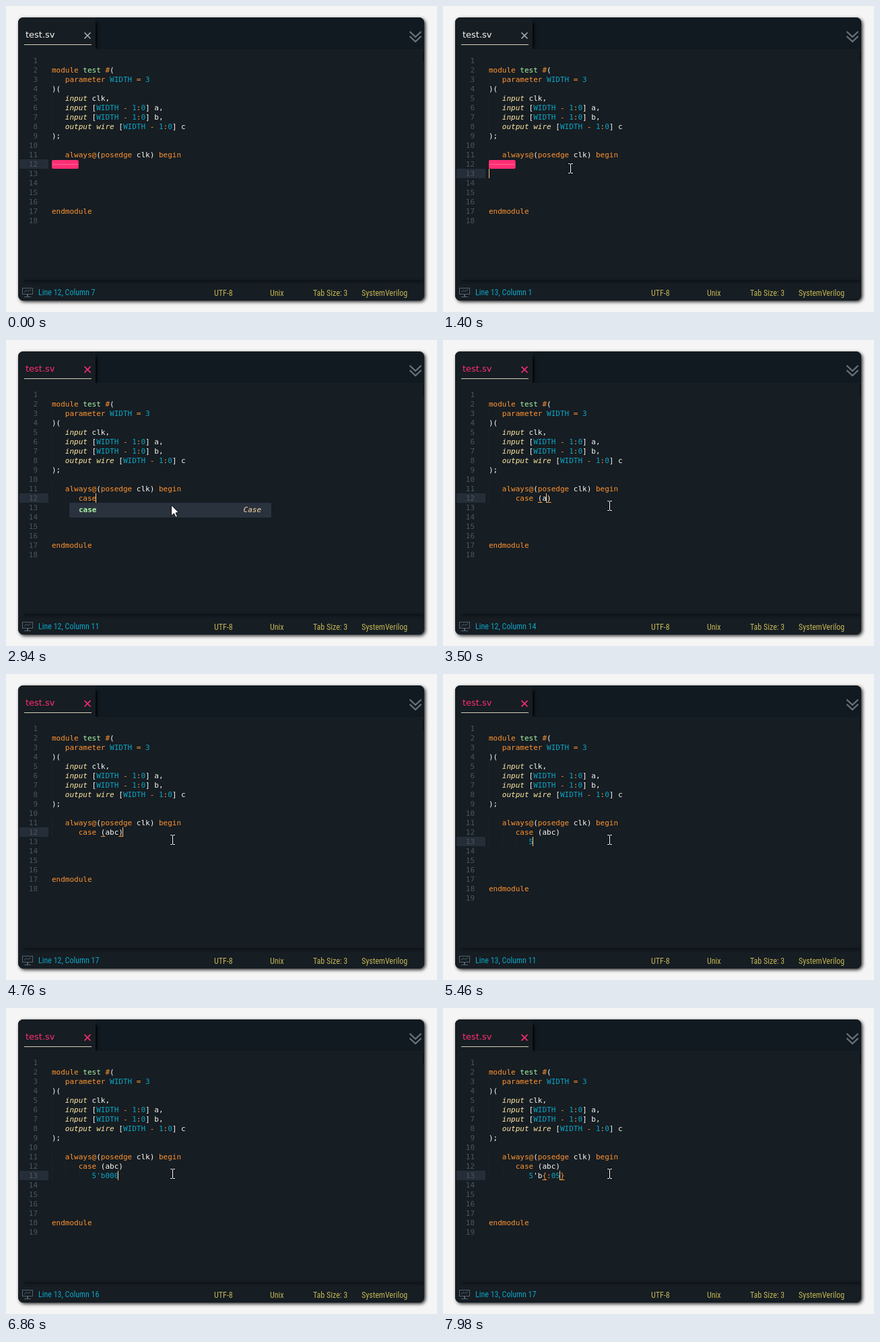
An HTML page with a canvas for the animation above (8 s loop, 640 by 455 pixels).

```html
<!DOCTYPE html>
<html lang="en">
<head>
<meta charset="utf-8">
<title>Code editor</title>
<style>
html, body { margin: 0; width: 640px; height: 455px; overflow: hidden; background: #f5f5f5; }
canvas { display: block; }
</style>
</head>
<body>
<canvas id="stage" width="640" height="455"></canvas>
<script>
const g = document.getElementById('stage').getContext('2d');
const LOOP = 8000, TICK = 140, NEWLINE = 5040, DIRTY = 2520;
const LEFT = 68, CHAR = 6.622, ROW = 14;
const MONO = '11px "DejaVu Sans Mono", monospace';
const STATUS = '12px "Roboto Condensed", Roboto, sans-serif';
const C = {
  bg: '#161d23', bar: '#111a20', white: '#f8f8f2', orange: '#ff9430', blue: '#0ca5c4',
  yellow: '#ffe9a0', green: '#aef5a8', pink: '#ff2f74', gold: '#c3b552', dim: '#4a565f'
};

const source = `
module test #(
   parameter WIDTH = 3
)(
   input clk,
   input [WIDTH - 1:0] a,
   input [WIDTH - 1:0] b,
   output wire [WIDTH - 1:0] c
);

   always@(posedge clk) begin
      




endmodule
`.split('\n');

// [time, line, indent, text, caret distance from the line end, completion]
const edits = [
  [0, 12, 6, '', 0],
  [1120, 13, 0, '', 0],
  [1680, 12, 6, '', 0],
  [2520, 12, 6, 'c', 0],
  [2660, 12, 6, 'ca', 0, 'case'],
  [2800, 12, 6, 'cas', 0, 'case'],
  [2940, 12, 6, 'case', 0, 'case'],
  [3080, 12, 6, 'case', 0],
  [3220, 12, 6, 'case ', 0],
  [3360, 12, 6, 'case ()', 1],
  [3500, 12, 6, 'case (a)', 1],
  [3640, 12, 6, 'case (ab)', 1],
  [3920, 12, 6, 'case (a)', 1],
  [4060, 12, 6, 'case ()', 1],
  [4200, 12, 6, 'case ', 0],
  [4340, 12, 6, 'case ()', 1],
  [4480, 12, 6, 'case (ab)', 1],
  [4620, 12, 6, 'case (abc)', 1],
  [4760, 12, 6, 'case (abc)', 0],
  [NEWLINE, 13, 6, '', 0],
  [5320, 13, 9, '', 0],
  [5460, 13, 9, '5', 0],
  [5600, 13, 9, "5'", 0],
  [6160, 13, 9, "5'b", 0],
  [6300, 13, 9, "5'b", 0, 'begin'],
  [6580, 13, 9, "5'b0", 0],
  [6720, 13, 9, "5'b00", 0],
  [6860, 13, 9, "5'b000", 0],
  [7000, 13, 9, "5'b", 0],
  [7420, 13, 9, "5'b{}", 1],
  [7560, 13, 9, "5'b{:0}", 1],
  [7700, 13, 9, "5'b{:05}", 1]
];

const TOKENS = /\b(input|output|wire)\b|\b(module|parameter|always|posedge|begin|endmodule|case)\b|([#=@:{}-])|(WIDTH|\d+(?:'b\d+)?)|\b(test)\b|[^\s]/g;

const colX = col => LEFT + col * CHAR;
const rowY = line => 74 + (line - 1) * ROW;

function box(x, y, w, h, color) {
  g.fillStyle = color;
  g.fillRect(x, y, w, h);
}

function text(str, x, y, color, font = MONO, align = 'left') {
  g.font = font;
  g.textAlign = align;
  g.fillStyle = color;
  g.fillText(str, x, y);
}

function stroke(points, color, width = 1) {
  g.strokeStyle = color;
  g.lineWidth = width;
  g.beginPath();
  points.forEach(([x, y]) => g.lineTo(x, y));
  g.stroke();
}

function shadow(color, blur, dx, dy) {
  g.shadowColor = color;
  g.shadowBlur = blur;
  g.shadowOffsetX = dx;
  g.shadowOffsetY = dy;
}

function drawWindow(dirty) {
  box(0, 0, 640, 455, '#f5f5f5');
  g.save();
  shadow('rgba(0,0,0,.85)', 5, 2, 2);
  g.fillStyle = C.bg;
  g.beginPath();
  g.roundRect(18, 17, 603, 421, 8);
  g.fill();
  shadow('transparent', 0, 0, 0);
  g.clip();
  box(18, 17, 603, 47, C.bar);
  shadow('#000', 4, 2, 0);
  box(18, 25, 115, 39, C.bg);
  shadow('transparent', 0, 0, 0);
  box(18, 64, 603, 374, C.bg);
  box(18, 17, 115, 47, C.bg);
  box(619, 67, 1, 16, '#0a0f13');
  shadow('#000', 4, 1, 1);
  box(27, 408, 592, 1, '#0b1014');
  g.restore();

  text('test.sv', 29, 47, dirty ? C.pink : C.white, '13px "DejaVu Sans", sans-serif');
  box(27, 57, 100, 1, '#d5d0b8');
  const cross = dirty ? C.pink : '#a4abb0';
  stroke([[116.5, 39.5], [125.5, 48.5]], cross, 1.7);
  stroke([[125.5, 39.5], [116.5, 48.5]], cross, 1.7);
  for (const y of [38, 45]) stroke([[599.5, y], [608, y + 8], [616.5, y]], '#69747c', 2.3);
}

function drawStatus(line, col) {
  g.strokeStyle = '#53616b';
  g.lineWidth = 1;
  g.strokeRect(24.5, 419.5, 15, 9);
  stroke([[27, 425.5], [31, 422.5], [33, 424.5], [37, 421.5]], '#53616b');
  stroke([[32, 429], [32, 432]], '#53616b', 2);
  stroke([[27, 432.5], [37, 432.5]], '#53616b');
  text(`Line ${line}, Column ${col}`, 48, 430, C.blue, STATUS);
  [['UTF-8', 309], ['Unix', 392], ['Tab Size: 3', 456], ['SystemVerilog', 528]]
    .forEach(([label, x]) => text(label, x, 431, C.gold, STATUS));
}

function drawLine(str, line) {
  const y = rowY(line);
  text(line, 47, y + 11, C.dim, MONO, 'right');
  const indent = str.match(/^ */)[0].length;
  for (let col = 0; col < indent; col += 3)
    for (let dy = 0; dy < ROW; dy += 2) box(Math.round(colX(col)), y + dy, 1, 1, '#20282f');
  const tail = str.match(/ +$/);
  if (tail) {
    const x = colX(tail.index), w = tail[0].length * CHAR;
    g.fillStyle = C.pink;
    g.beginPath();
    g.roundRect(x, y + 1, w, 13, 2);
    g.fill();
    if (w > 20) box(x + 1, y + 7, w - 2, 1, '#ff6695');
  }
  for (const m of str.matchAll(TOKENS)) {
    const color = m[1] ? C.yellow : m[2] || m[3] ? C.orange : m[4] ? C.blue : m[5] ? C.green : C.white;
    text(m[0], colX(m.index), y + 11, color, (m[1] ? 'italic ' : '') + MONO);
  }
}

function drawCaret(str, line, col, visible) {
  const y = rowY(line);
  const open = str.search(/[({]/), close = str.search(/[)}]/);
  if (open >= 0 && col > open && col <= close + 1)
    for (const c of [open, close]) box(colX(c), y + 13, CHAR, 1, C.orange);
  if (visible) box(Math.round(colX(col)) - 1 + (col === 0), y, 1, ROW, '#ffc078');
}

function drawPopup(word, line, col) {
  const x = Math.round(colX(col)) - 14, y = rowY(line + 1);
  box(x, y, 300, 22, '#29323d');
  text(word, x + 14, y + 14, C.green, 'bold ' + MONO);
  text(word[0].toUpperCase() + word.slice(1), x + 285, y + 14, '#ffd9a8', 'italic ' + MONO, 'right');
}

function mouseAt(t) {
  const ease = (from, to) => {
    const p = Math.min(1, Math.max(0, (t - from) / (to - from)));
    return p * p * (3 - 2 * p);
  };
  const a = ease(0, 1120), b = ease(1400, 1820);
  return [Math.round(615 - 426 * a + 58 * b), Math.round(75 + 166 * a + 5 * b)];
}

function drawMouse([x, y], arrow) {
  if (arrow) {
    g.beginPath();
    [[0, 0], [0, 16], [4, 12.5], [6.5, 18], [9, 17], [6.5, 11.5], [11, 11]]
      .forEach(([dx, dy]) => g.lineTo(x - 1.5 + dx, y - 0.5 + dy));
    g.closePath();
    g.fillStyle = '#fff';
    g.fill();
    g.strokeStyle = '#111';
    g.lineWidth = 1;
    g.stroke();
    return;
  }
  const parts = [[-3, -7, 3, 1], [1, -7, 3, 1], [0, -6, 1, 13], [-3, 7, 3, 1], [1, 7, 3, 1]];
  parts.forEach(([dx, dy, w, h]) => box(x + dx - 1, y + dy - 1, w + 2, h + 2, '#0b1014'));
  parts.forEach(([dx, dy, w, h]) => box(x + dx, y + dy, w, h, '#fff'));
}

function draw(now) {
  const t = Math.floor(now % LOOP / TICK) * TICK;
  const lines = [...source];
  let current;
  for (const e of edits) {
    if (e[0] > t) break;
    if (e[0] === NEWLINE) lines.splice(12, 0, '');
    lines[e[1] - 1] = ' '.repeat(e[2]) + e[3];
    current = e;
  }
  const [time, line, , , back, popup] = current;
  const str = lines[line - 1], col = str.length - back;
  const caretOn = time > 0 && (t - time) % 1120 < 560;

  drawWindow(t >= DIRTY);
  box(20, rowY(line), 43, ROW, '#252e38');
  lines.forEach((s, i) => drawLine(s, i + 1));
  drawCaret(str, line, col, caretOn);
  if (popup) drawPopup(popup, line, str.search(/[a-z]+$/));
  drawStatus(line, col + 1);
  if (t > 0) drawMouse(mouseAt(t), popup && line === 12);
}

const start = performance.now();
(function frame() {
  draw(performance.now() - start);
  requestAnimationFrame(frame);
})();
</script>
</body>
</html>
```
